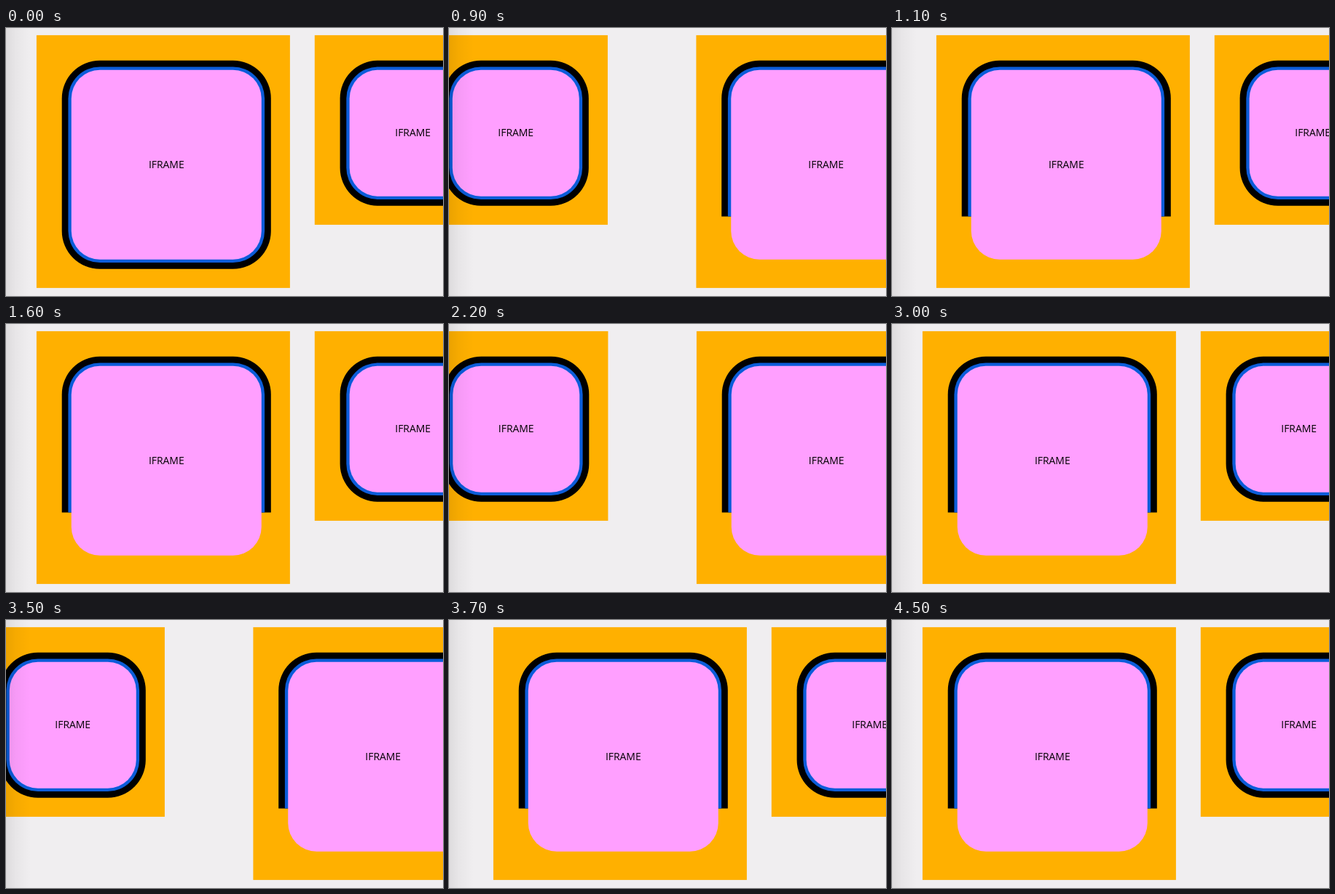
Recreate the animation shown at these times as an HTML page. Size 600x369 px, loop 4600 ms.

```html
<!DOCTYPE html>
<html lang="en">
<head>
<meta charset="utf-8">
<style>
  html, body { margin: 0; width: 100%; height: 100%; overflow: hidden; background: #f0eef0; }
  svg { display: block; width: 100%; height: 100%; }
  text { font: 13.92px "Open Sans", "Noto Sans", sans-serif; text-anchor: middle; }
</style>
</head>
<body>
<svg viewBox="0 0 600 369">
  <defs>
    <linearGradient id="shade">
      <stop offset="0" stop-opacity=".08"/>
      <stop offset=".4" stop-opacity=".035"/>
      <stop offset="1" stop-opacity="0"/>
    </linearGradient>
    <clipPath id="cut"><rect y="0" width="1200" height="259.4"/></clipPath>
  </defs>
  <g id="strip"></g>
  <rect width="34" height="369" fill="url(#shade)"/>
</svg>
<script>
const LOOP = 4600, STEP = 100;
const SCROLL_STARTS = [900, 2100, 3500];
// Strip offset for each step of a scroll: to the end, back, rubber-band settle.
const SCROLL = [-466.9, -466.4, 19, 6.6, 1.8, 0];
const TOP = 9.9, UNIT = 0.87;
const strip = document.getElementById('strip');

function roundRect(x, y, size, grow, fill) {
  const side = size + 2 * grow;
  return `<rect x="${x - grow}" y="${y - grow}" width="${side}" height="${side}" rx="${39.15 + grow}" fill="${fill}"/>`;
}

function card(x, units) {
  const side = units * UNIT, inner = side - 100 * UNIT;
  const px = x + 55 * UNIT, py = TOP + 55 * UNIT;
  return `<rect x="${x}" y="${TOP}" width="${side}" height="${side}" fill="#ffb000"/>
    <g class="outline">${roundRect(px, py, inner, 15 * UNIT, '#000')}${roundRect(px, py, inner, 5 * UNIT, '#0b5cd9')}</g>
    ${roundRect(px, py, inner, 0, '#ff9fff')}
    <text x="${px + inner / 2}" y="${py + inner / 2 + 4.4}">IFRAME</text>`;
}

strip.innerHTML = card(41.9, 400) + card(423.8, 300) + card(806.3, 400);
const [first, , last] = strip.querySelectorAll('.outline');
last.setAttribute('clip-path', 'url(#cut)');

function offsetAt(time) {
  const start = SCROLL_STARTS.findLast(s => s <= time);
  return SCROLL[Math.floor((time - start) / STEP)] ?? 0;
}

function draw(now) {
  const time = now % LOOP;
  strip.setAttribute('transform', `translate(${offsetAt(time)})`);
  first.setAttribute('clip-path', time < SCROLL_STARTS[0] ? 'none' : 'url(#cut)');
}

let origin;
function tick(now) {
  origin ??= now;
  draw(now - origin);
  requestAnimationFrame(tick);
}
draw(0);
requestAnimationFrame(tick);
</script>
</body>
</html>
```
